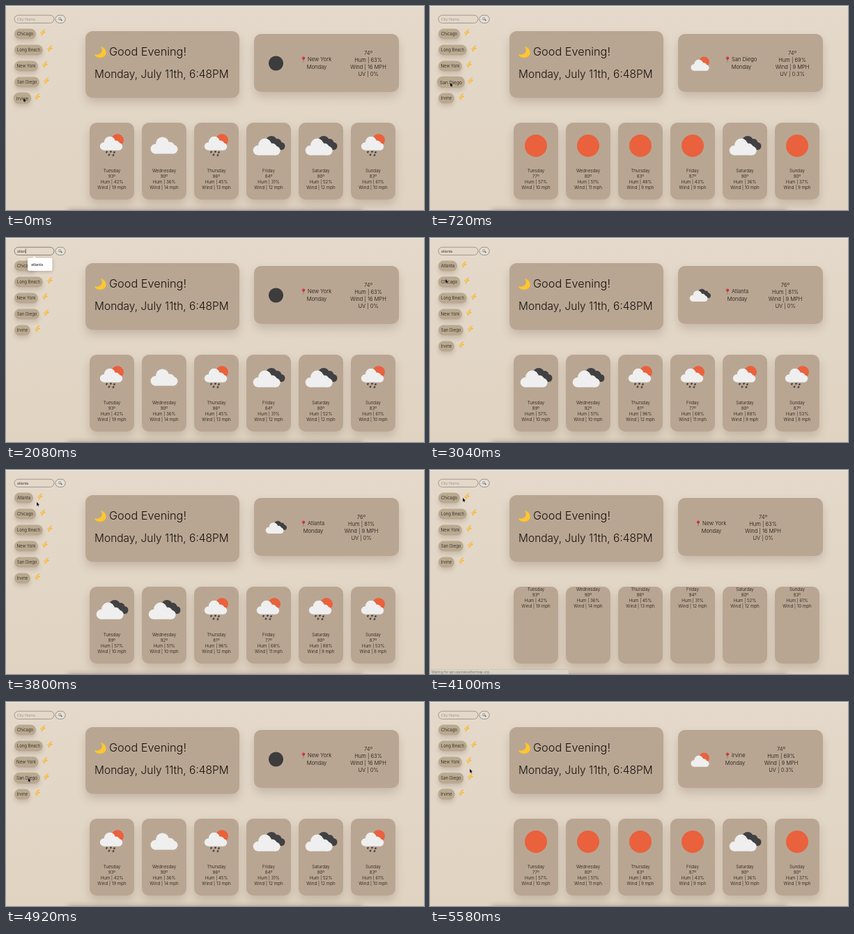
Write an HTML page with a canvas that moves like this. It is 600 px wide and 292 px high and loops after 5.6 s.

```html
<!DOCTYPE html>
<html lang="en">
<head>
<meta charset="utf-8">
<title>Weather dashboard</title>
<style>
html, body { margin: 0; width: 100%; height: 100%; overflow: hidden; background: #e2d7c7; }
canvas { display: block; }
</style>
</head>
<body>
<canvas width="600" height="292"></canvas>
<script>
const c = document.querySelector('canvas').getContext('2d');
const LOOP = 5600, CARD = '#b9a692', INK = '#15110e', DARK = '#414042', SUN = '#e9613d', WHITE = '#efefef';
const DAYS = ['Tuesday', 'Wednesday', 'Thursday', 'Friday', 'Saturday', 'Sunday'];

// Forecast entries: icon, temperature, humidity, wind
const COAST = 'sun 77 57 10,sun 80 51 11,sun 83 48 9,sun 87 43 9,broken 90 36 10,sun 90 37 9';
const CITIES = {
  'New York': { icon: 'night', now: ['74º', 'Hum | 63%', 'Wind | 16 MPH', 'UV | 0%'], dayX: 446, statX: 520,
    week: 'rain 93 42 19,cloud 90 36 14,rain 86 45 13,broken 84 31 12,broken 80 52 12,rain 83 61 10' },
  'San Diego': { icon: 'partly', now: ['74º', 'Hum | 69%', 'Wind | 9 MPH', 'UV | 0.3%'], dayX: 447, statX: 520, week: COAST },
  'Irvine': { icon: 'partly', now: ['74º', 'Hum | 69%', 'Wind | 9 MPH', 'UV | 0.3%'], dayX: 438, statX: 504, week: COAST },
  'Atlanta': { icon: 'broken', now: ['76º', 'Hum | 81%', 'Wind | 9 MPH', 'UV | 0%'], dayX: 441, statX: 510,
    week: 'broken 89 57 10,broken 92 51 10,rain 81 96 12,rain 77 68 11,rain 80 88 9,rain 87 53 8' }
};
const SHOWN = [[0, 'New York'], [300, 'Irvine'], [640, 'San Diego'], [1300, 'New York'],
  [2700, 'Atlanta'], [4080, 'New York'], [4960, 'San Diego'], [5400, 'Irvine']];
const PILLS = { Atlanta: 27, Chicago: 31, 'Long Beach': 41, 'New York': 34, 'San Diego': 36, Irvine: 23 };
const PATH = [[0, 25, 132], [260, 25, 132], [480, 29, 110], [780, 29, 110], [1100, 30, 88], [1340, 30, 87],
  [1600, 40, 19], [2420, 40, 19], [2560, 78, 19], [2840, 78, 19], [3060, 21, 60], [3300, 23, 61],
  [3800, 44, 46], [3960, 48, 39], [4240, 46, 41], [4480, 46, 44], [4700, 46, 74], [4880, 32, 109],
  [5060, 30, 109], [5250, 25, 132], [5420, 25, 132], [5580, 57, 96], [5600, 57, 96]];

const listAt = t => Object.keys(PILLS).slice(t >= 2700 && t < 4000 ? 0 : 1);

function cursorAt(t) {
  const i = PATH.findIndex(p => p[0] > t);
  const [t0, x0, y0] = PATH[i - 1], [t1, x1, y1] = PATH[i];
  let k = (t - t0) / (t1 - t0);
  k = k * k * (3 - 2 * k);
  return [x0 + (x1 - x0) * k, y0 + (y1 - y0) * k];
}

// Share of the last 200 ms during which the cursor was over a pill
function hover(t, name) {
  let hits = 0;
  for (let k = 0; k < 10; k++) {
    const past = Math.max(0, t - k * 20), [x, y] = cursorAt(past);
    const row = listAt(past).indexOf(name);
    if (x > 12 && x < 12 + PILLS[name] && Math.abs(y - 40 - row * 23) < 8) hits++;
  }
  return hits / 10;
}

function text(s, x, y, size, align = 'left', color = INK, weight = 300) {
  c.font = `${weight} ${size}px Inter, sans-serif`;
  c.textAlign = align;
  c.textBaseline = 'alphabetic';
  c.fillStyle = color;
  c.fillText(s, x, y + size * 0.36);
}

function box(x, y, w, h, r, fill, shade, blur = 14, drop = 7) {
  c.save();
  if (shade) {
    c.shadowColor = `rgba(60,40,20,${shade})`;
    c.shadowBlur = blur;
    c.shadowOffsetY = drop;
  }
  c.beginPath();
  c.roundRect(x, y, w, h, r);
  c.fillStyle = fill;
  c.fill();
  c.restore();
}

function disc(x, y, r, fill) {
  c.beginPath();
  c.arc(x, y, r, 0, 7);
  c.fillStyle = fill;
  c.fill();
}

function poly(points, fill) {
  c.beginPath();
  points.forEach(p => c.lineTo(...p));
  c.closePath();
  c.fillStyle = fill;
  c.fill();
}

function line(x0, y0, x1, y1, width, color) {
  c.beginPath();
  c.moveTo(x0, y0);
  c.lineTo(x1, y1);
  c.lineWidth = width;
  c.strokeStyle = color;
  c.stroke();
}

function at(x, y, scale, draw) {
  c.save();
  c.translate(x, y);
  c.scale(scale, scale);
  draw();
  c.restore();
}

function cloud(x, y, s) {
  at(x, y, s, () => {
    disc(-12.5, 5, 7, WHITE);
    disc(-2.5, -2.5, 9.5, WHITE);
    disc(8, 2, 7, WHITE);
    disc(13, 5.5, 6.5, WHITE);
    c.fillRect(-12.5, 2, 25.5, 10);
  });
}

function darkCloud() {
  disc(4, -6, 8, DARK);
  disc(12.5, -4, 6, DARK);
  disc(18, 0.5, 5.5, DARK);
  c.fillRect(4, -4, 14, 10);
}

const ICONS = {
  sun: () => disc(0, 0, 16, SUN),
  night: () => disc(0, 0, 16, '#3c3c3d'),
  cloud: () => cloud(0, -0.5, 1),
  broken: () => { darkCloud(); cloud(-2.8, 1.6, 1); },
  partly: () => { disc(9, -3, 11.5, SUN); cloud(0, 4, 1.02); },
  rain: () => {
    disc(8, -8, 9, SUN);
    cloud(-1, -3.4, 0.83);
    for (const [x, y] of [[-7.5, 9], [-1.5, 8.5], [3.5, 9.5], [-4, 13], [2, 13.5]]) {
      line(x + 0.8, y - 1.2, x - 0.8, y + 1.2, 2.1, DARK);
    }
  }
};

function bolt(x, y) {
  at(x, y, 0.9, () => {
    poly([[1.5, -5], [-4.5, 1.2], [-0.8, 1.2], [-3, 5.5], [4.8, -1.2], [0.9, -1.2], [4, -5]], '#efa93a');
    poly([[1.6, -4.3], [-3, 0.6], [0.4, 0.6], [-1.4, 3.7], [3, -0.6], [-0.2, -0.6], [2.8, -4.3]], '#ffd35c');
  });
}

function moon() {
  c.beginPath();
  c.moveTo(136, 58);
  c.bezierCurveTo(147, 61, 146, 74, 135, 74);
  c.bezierCurveTo(131, 74, 128, 72, 127, 69);
  c.bezierCurveTo(135, 71, 141, 66, 136, 58);
  c.fillStyle = '#fdc630';
  c.fill();
}

function pin(x) {
  line(x, 76, x, 80.5, 0.8, '#77706c');
  disc(x, 74.7, 2.1, '#cf2a35');
  disc(x - 0.6, 74, 0.6, '#ea8080');
}

function background() {
  const g = c.createLinearGradient(0, 0, 0, 292);
  g.addColorStop(0, '#e4d9ca');
  g.addColorStop(1, '#e0d3c2');
  c.fillStyle = g;
  c.fillRect(0, 0, 600, 292);
  c.fillStyle = '#f1eeea';
  c.fillRect(0, 0, 600, 1);
  box(88, 293, 424, 10, 0, '#999', 0.45, 8, 0);
}

function search(t) {
  const typed = 'atlanta'.slice(0, t >= 1800 && t < 4080 ? Math.floor((t - 1800) / 70) + 1 : 0);
  const focused = t >= 1660 && t < 2640;
  c.lineWidth = focused ? 0.9 : 0.65;
  c.strokeStyle = '#7d766f';
  c.beginPath();
  c.roundRect(12, 13.2, 57, 11.2, 5.6);
  c.stroke();
  text(typed || 'City Name...', 16, 18.8, 5.3, 'left', typed ? INK : '#8d857d');
  if (focused) {
    const x = 16.5 + (typed ? c.measureText(typed).width : 0);
    line(x, 15.5, x, 22, 0.6, INK);
  }
  box(71, 13.2, 14.2, 11.2, 5.6, '#e6dfd5');
  c.lineWidth = 0.65;
  c.strokeStyle = '#6f6963';
  c.stroke();
  line(78.6, 19.4, 80.4, 21.2, 1.1, '#4a4643');
  disc(77.4, 18.2, 2, '#77726e');
  disc(77.4, 18.2, 1.4, '#c9dae0');
}

function pills(t) {
  listAt(t).forEach((name, i) => {
    const w = PILLS[name], y = 40 + i * 23;
    at(12 + w / 2, y, 1 + 0.11 * hover(t, name), () => {
      box(-w / 2, -7.5, w, 15, 7.5, '#b9a990', 0.16, 6, 4);
      text(name, 0, 0.2, 6, 'center');
    });
    bolt(21.8 + w, y - 1.8);
  });
}

function current(city, name, bare) {
  const shift = bare ? -42 : 0;
  box(356, 40, 208, 83, 10, CARD, 0.18);
  if (!bare) at(387.5, 82, 0.66, ICONS[city.icon]);
  pin(427 + shift);
  text(name, 433 + shift, 76.5, 7.6);
  text('Monday', city.dayX + shift, 87.5, 7.6, 'center');
  city.now.forEach((s, i) => text(s, city.statX + shift, 67 + i * 10, 7.6, 'center'));
}

function forecast(city, bare) {
  city.week.split(',').forEach((entry, i) => {
    const [icon, temp, hum, wind] = entry.split(' '), x = 152 + i * 75;
    box(x - 32, 167, 64, 110, 10, CARD, 0.18);
    if (!bare) at(x, 200, 1, ICONS[icon]);
    [DAYS[i], temp + 'º', `Hum | ${hum}%`, `Wind | ${wind} mph`]
      .forEach((s, k) => text(s, x, (bare ? 171 : 235.9) + k * 7.9, 6.25, 'center'));
  });
}

function pointer(t) {
  if (t >= 1780 && t < 2420) return;
  at(...cursorAt(t), 0.9, () => {
    poly([[0, -0.6], [0, 6.2], [1.5, 5], [2.5, 7], [3.6, 6.5], [2.7, 4.5], [4.7, 4.4]], '#000');
    c.lineWidth = 0.4;
    c.strokeStyle = 'rgba(255,255,255,.7)';
    c.stroke();
  });
}

function draw(t) {
  const name = SHOWN.findLast(s => s[0] <= t)[1], city = CITIES[name];
  const bare = t >= 4080 && t < 4340;
  background();
  box(114, 36, 221, 95.5, 10, CARD, 0.18);
  moon();
  text('Good Evening!', 148, 65.3, 16.3);
  text('Monday, July 11th, 6:48PM', 127, 97.2, 15.5);
  current(city, name, bare);
  forecast(city, bare);
  search(t);
  pills(t);
  if (t >= 1800 && t < 2260) {
    box(31, 28.5, 35.5, 18.5, 2, '#fff', 0.3, 5, 1);
    poly([[38, 28.6], [40.5, 26], [43, 28.6]], '#fff');
    text('atlanta', 36, 38, 5.4, 'left', '#111', 400);
  }
  if (bare) {
    box(-3, 286, 202, 9, 2, '#d9d2c9', 0.2, 2, 0);
    text('Waiting for api.openweathermap.org...', 2, 289.6, 4.8, 'left', '#77716b', 400);
  }
  pointer(t);
}

function tick(now) {
  draw(now % LOOP);
  requestAnimationFrame(tick);
}
requestAnimationFrame(tick);
</script>
</body>
</html>
```
